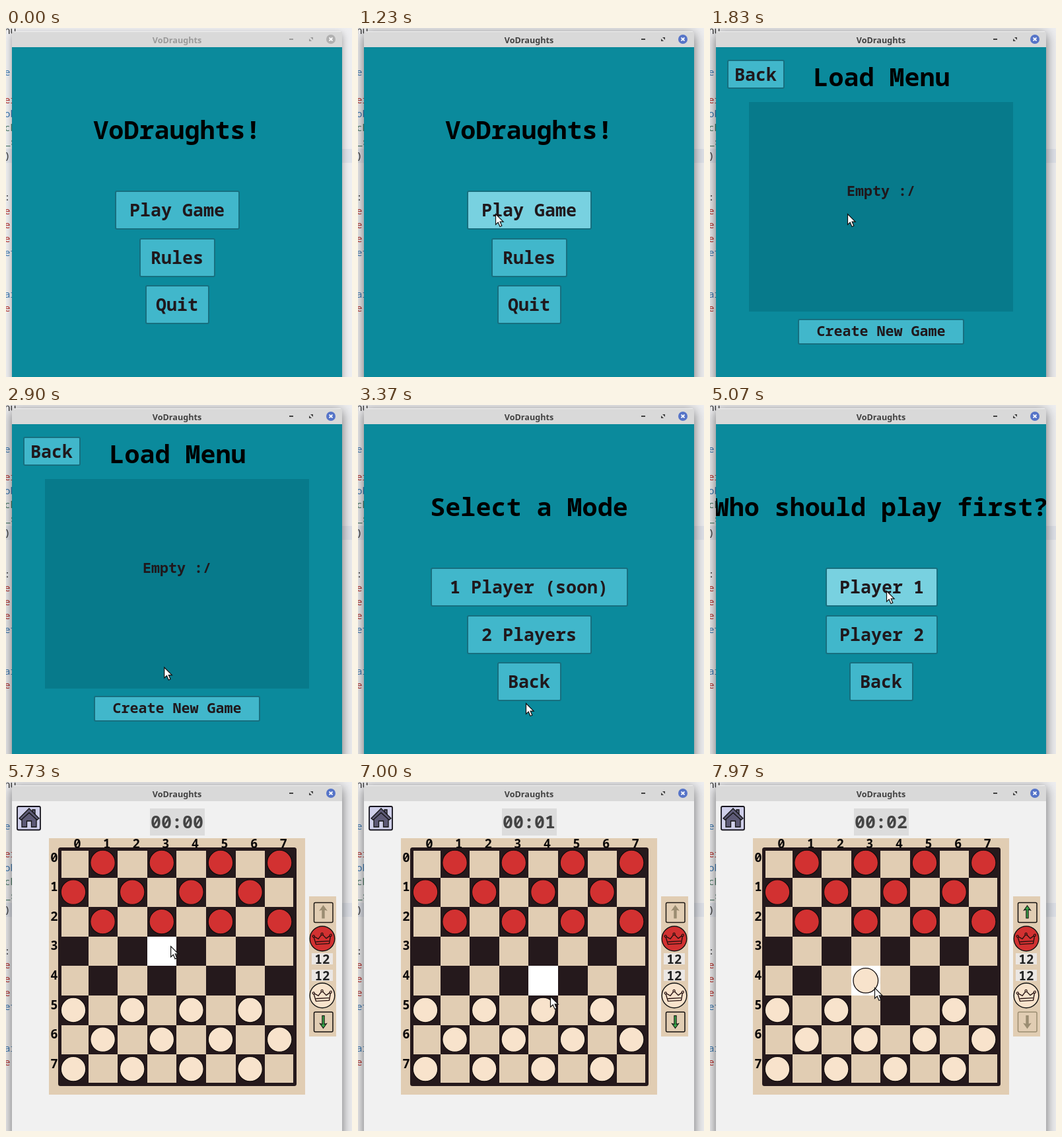
An HTML page with a canvas that plays this animation: 524 px wide and 528 px high, repeating every 8 s.

```html
<!DOCTYPE html>
<html lang="en">
<head>
<meta charset="utf-8">
<title>VoDraughts</title>
<style>
  html, body { margin: 0; width: 100%; height: 100%; overflow: hidden; }
  canvas { display: block; }
</style>
</head>
<body>
<canvas id="stage" width="524" height="528"></canvas>
<script>
const ctx = document.getElementById('stage').getContext('2d');
const LOOP = 8000, ENTER = 370, FOCUS = 1230, LOAD = 1470, MODE = 3370, FIRST = 4000, PLAY = 5170;
const PICK = 7370, DROP = 7870, HOVER_LAG = 40;
const MONO = '"Noto Sans Mono", monospace';
const INK = '#20181c', DARK = '#25191c', TAN = '#e1cdb3', RED = '#d23131', CREAM = '#f8e3cc';
const CELL = 44.6, LEFT = 80, TOP = 100, MID = 259;

// Pointer stops: departure, travel time, x, y
const STOPS = [
  [0, 1, 38, 422], [ENTER, 260, 208, 281], [2630, 570, 254, 451], [3570, 260, 260, 345],
  [4670, 360, 267, 281], [5590, 360, 236, 224], [6670, 330, 291, 324], [7050, 150, 284, 346],
  [7500, 360, 249, 311]
];

function pointerAt(t) {
  let x = 0, y = 0;
  for (const [start, duration, toX, toY] of STOPS) {
    const p = Math.min(1, Math.max(0, (t - start) / duration));
    const k = Math.sin(p * Math.PI / 2);
    x += (toX - x) * k;
    y += (toY - y) * k;
  }
  return { x, y };
}

function rect(x, y, w, h, color) {
  ctx.fillStyle = color;
  ctx.fillRect(x, y, w, h);
}

function text(str, x, y, size, color = INK, { align = 'center', font = MONO, weight = 'bold' } = {}) {
  ctx.font = `${weight} ${size}px ${font}`;
  ctx.textAlign = align;
  ctx.fillStyle = color;
  ctx.fillText(str, x, y);
}

function paint(fill, stroke, width = 1.3) {
  if (fill) { ctx.fillStyle = fill; ctx.fill(); }
  if (stroke) { ctx.strokeStyle = stroke; ctx.lineWidth = width; ctx.stroke(); }
}

function shape(points, fill, stroke, width) {
  ctx.beginPath();
  points.forEach(([x, y]) => ctx.lineTo(x, y));
  ctx.closePath();
  paint(fill, stroke, width);
}

// Closes a right-hand outline with its mirror image
function mirrored(half, ...style) {
  shape([...half, ...half.map(([x, y]) => [-x, y]).reverse()], ...style);
}

function box(x, y, w, h, radius, fill, stroke, width) {
  ctx.beginPath();
  ctx.roundRect(x, y, w, h, radius);
  paint(fill, stroke, width);
}

function disc(x, y, r, fill, stroke, width) {
  ctx.beginPath();
  ctx.arc(x, y, r, 0, 2 * Math.PI);
  paint(fill, stroke, width);
}

function at(x, y, draw, angle = 0, flip = 1) {
  ctx.save();
  ctx.translate(x, y);
  ctx.rotate(angle);
  ctx.scale(1, flip);
  draw();
  ctx.restore();
}

function editor() {
  rect(0, 0, 524, 528, '#eeeef0');
  rect(0, 183, 524, 21, '#e0e3ea');
  const palette = { k: '#333', b: '#3b78b0', r: '#b8322c', g: '#4f7c68' };
  'knu,,,be(,,rer,bob,gch,g_s,k),,,k:,re,re,re,bet,,,bar,re'.split(',').forEach((line, i) =>
    text(line.slice(1), -2.5, 9 + 21 * i, 15, palette[line[0]], { align: 'left', weight: 'normal' }));
}

function titleBar(active) {
  ctx.save();
  ctx.shadowColor = `rgba(0,0,0,${active ? .55 : .35})`;
  ctx.shadowBlur = active ? 18 : 12;
  ctx.shadowOffsetY = 4;
  box(9, 5, 500, 540, [3, 3, 0, 0], '#d9d9d9');
  ctx.restore();
  rect(11, 5, 496, 1, '#efefef');
  const ink = active ? '#414141' : '#9a9a9a';
  text('VoDraughts', MID, 23, 12.6, ink, { font: '"Noto Sans", sans-serif', weight: 600 });
  rect(429, 16, 6, 2, ink);
  for (const side of [1, -1])
    at(462, 17, () => shape([[-1, -3], [3, -3], [3, 1]], ink), side < 0 ? Math.PI : 0);
  disc(492, 17, 7, active ? '#5674c8' : '#b1b1b1');
  for (const side of [1, -1])
    at(492, 17, () => rect(-3.5, -.9, 7, 1.8, '#fff'), side * Math.PI / 4);
}

function button(label, x, y, w, h, size, baseline, mouse) {
  const hover = mouse && mouse.x >= x && mouse.x <= x + w && mouse.y >= y && mouse.y <= y + h;
  box(x + 1, y + 1, w - 2, h - 2, 2, hover ? '#78d1e0' : '#41b7cb', '#176f7f', 2);
  text(label, x + Math.floor(w / 2), baseline, size);
}

function menu(title, labels, mouse) {
  text(title, MID, 168, 38.4, '#000');
  labels.forEach((label, i) => {
    const w = Math.round(label.length * 18.4 + 23), y = Math.round(246 + 71.5 * i);
    button(label, Math.round(MID + .5 - w / 2), y, w, 59, 26.67, y + 39, mouse);
  });
}

function loadMenu(mouse) {
  text('Load Menu', MID + 1, 88, 38.4, '#000');
  rect(59, 112, 400, 317, '#077a8b');
  text('Empty :/', MID, 254, 21.67);
  button('Back', 26, 48, 87, 44, 26.67, 80, mouse);
  button('Create New Game', 133, 440, 252, 39, 21.67, 466, mouse);
}

function homeIcon() {
  const wall = '#5d5a76', line = '#111';
  box(17, 37, 35, 35.5, 2, '#cfcfea', '#15131c', 1.8);
  at(35, 55, () => {
    box(5, -13, 4, 9, 0, wall, line);
    mirrored([[0, -10], [11, 0], [11, 13], [3.5, 13], [3.5, 4]], wall, line);
    mirrored([[0, -15], [15, 0], [12, 2.5], [0, -8.5]], wall, line);
  });
}

function crown(y, fill) {
  const tips = [-13, 0, 13].map(x => [x, -7 + Math.abs(x) / 5]);
  const [a, b, c] = tips;
  disc(479, y, 18.8, fill, '#111', 1.4);
  at(479, y, () => {
    shape([a, [-6, 0], b, [6, 0], c, [10, 8], [-10, 8]], null, '#24100f', 1.4);
    for (const [x, tipY] of tips) disc(x, tipY, 1.6, fill, '#24100f', 1.2);
    rect(-10, 3.5, 20, 1.3, '#24100f');
  }, -.06);
}

function turnArrow(y, flip, active, idleEdge) {
  box(466.5, y - 14.5, 28.5, 30, 2, TAN, active ? '#151110' : idleEdge, 1.5);
  const ink = active ? '#111' : '#9b8d72', fill = active ? '#38a848' : ink;
  at(480.5, y, () => mirrored([[0, -10], [5, -3], [1.6, -4], [1.6, 9]], fill, ink, 1.1), 0, flip);
}

function sidePanel(redTurn) {
  rect(459, 173, 41, 212, TAN);
  turnArrow(197, 1, redTurn, '#1f1915');
  crown(237, RED);
  crown(323, CREAM);
  for (const y of [259, 284]) {
    rect(463, y, 32, 17, '#ebe7e4');
    text('12', 479, y + 15.5, 19, '#222');
  }
  turnArrow(362.5, -1, !redTurn, '#9b8d72');
}

function eachCell(visit) {
  for (let row = 0; row < 8; row++)
    for (let col = 0; col < 8; col++) visit(row, col);
}

function board(t, mouse) {
  const hoverCol = Math.floor((mouse.x - LEFT) / CELL), hoverRow = Math.floor((mouse.y - TOP) / CELL);
  const picked = t >= PICK && t < DROP, moved = t >= DROP;
  const edge = i => Math.round(i * CELL), size = edge(8);
  rect(65, 85, 388, 388, TAN);
  rect(LEFT, TOP, size, size, DARK);
  eachCell((row, col) => {
    const option = picked && row === 4 && (col === 3 || col === 5);
    const lit = option || (row === hoverRow && col === hoverCol);
    if (!lit && (row + col) % 2) return;
    const x = edge(col), y = edge(row);
    rect(LEFT + x, TOP + y, edge(col + 1) - x, edge(row + 1) - y, lit ? '#fff' : TAN);
  });
  box(LEFT + 1.5, TOP + 1.5, size - 1, size - 1, 1, null, DARK, 5);
  eachCell((row, col) => {
    const start = (row + col) % 2 && (row < 3 || row > 4);
    const left = row === 5 && col === 4, arrived = row === 4 && col === 3;
    if (moved ? arrived || (start && !left) : start)
      disc(102 + col * CELL, 122 + row * CELL, 18.8, row < 3 ? RED : CREAM, '#120c0d');
  });
  for (let i = 0; i < 8; i++) {
    text(i, 108 + i * CELL, 100, 19, '#0c090a');
    text(i, 73, 120.5 + i * CELL, 19, '#0c090a');
  }
}

function game(t, mouse) {
  rect(9, 29, 500, 499, '#f1f1f1');
  homeIcon();
  rect(218, 40, 83, 41, '#dcdcdc');
  text('00:0' + Math.max(0, Math.floor((t - PLAY - 30) / 1000)), MID, 70, 26.67, '#444');
  board(t, mouse);
  sidePanel(t >= DROP);
}

function pointer({ x, y }) {
  const outline = [[0, 0], [0, 16], [3.7, 12.6], [6.5, 19], [9.3, 17.8], [6.6, 11.6], [11.6, 11.6]];
  at(x + .5, y + .5, () => shape(outline, '#fff', '#111', 1.2));
}

function draw(t) {
  const mouse = t >= ENTER ? pointerAt(t - HOVER_LAG) : null;
  editor();
  titleBar(t >= FOCUS);
  ctx.save();
  ctx.beginPath();
  ctx.rect(9, 29, 500, 499);
  ctx.clip();
  rect(9, 29, 500, 499, '#0b8a9c');
  if (t < LOAD) menu('VoDraughts!', ['Play Game', 'Rules', 'Quit'], mouse);
  else if (t < MODE) loadMenu(mouse);
  else if (t < FIRST) menu('Select a Mode', ['1 Player (soon)', '2 Players', 'Back'], mouse);
  else if (t < PLAY) menu('Who should play first?', ['Player 1', 'Player 2', 'Back'], mouse);
  else game(t, mouse);
  ctx.restore();
  if (mouse) pointer(pointerAt(t));
}

function tick() {
  draw(performance.now() % LOOP);
  requestAnimationFrame(tick);
}
tick();
</script>
</body>
</html>
```
